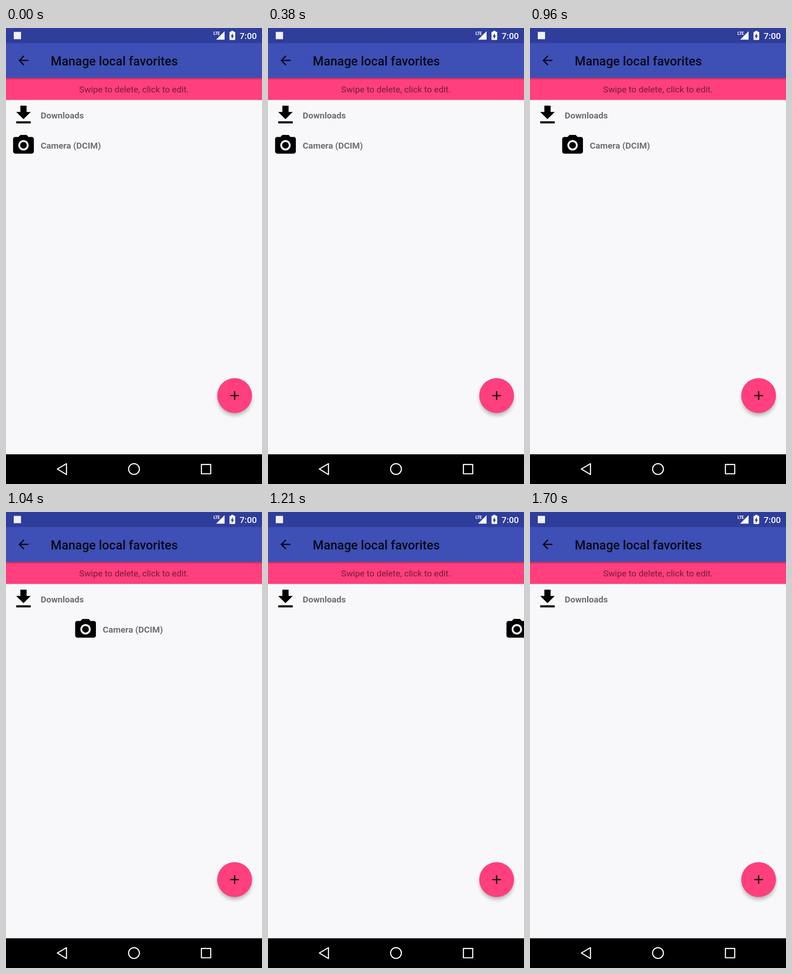
An HTML page for the animation above (1.99 s loop, 561x998 px).

```html
<!DOCTYPE html>
<html lang="en">
<head>
<meta charset="utf-8">
<title>Manage local favorites</title>
<style>
  html, body { margin: 0; width: 100%; height: 100%; overflow: hidden; background: #f8f8fa; }
  svg { display: block; width: 561px; height: 998px; }
  text { font-family: Roboto, sans-serif; font-size: 19.1px; }
  .title { font-size: 27.3px; font-weight: 500; fill: #080a16; }
  .hint { fill: #751d3b; text-anchor: middle; }
  .label { font-weight: 700; fill: #6f6f71; }
  .clock { font-weight: 500; fill: #fff; }
  .network { font-size: 9.5px; font-weight: 700; font-stretch: 75%; letter-spacing: -.5px; fill: #fff; }
  .nav { fill: none; stroke: #fff; stroke-width: 2.4; stroke-linejoin: round; }
  .swiped { animation: swipe 1990ms step-end infinite; }

  /* The finger drags the row, then flings it off the right edge. */
  @keyframes swipe {
    0% { transform: translateX(0); }
    46.1% { transform: translateX(20px); }
    48.2% { transform: translateX(55px); }
    50.2% { transform: translateX(93px); }
    52.2% { transform: translateX(136px); }
    54.2% { transform: translateX(204px); }
    56.2% { transform: translateX(296px); }
    58.2% { transform: translateX(400px); }
    60.7% { transform: translateX(507px); }
    62.8%, 100% { transform: translateX(600px); }
  }
</style>
</head>
<body>
<svg viewBox="0 0 561 998">
  <defs>
    <linearGradient id="barShadow" x2="0" y2="1">
      <stop stop-color="#000" stop-opacity=".3"/>
      <stop offset="1" stop-color="#000" stop-opacity="0"/>
    </linearGradient>
    <filter id="soft" x="-30%" y="-30%" width="160%" height="160%">
      <feGaussianBlur stdDeviation="4.5"/>
    </filter>
  </defs>

  <rect width="561" height="998" fill="#f8f8fa"/>

  <!-- Status bar -->
  <rect width="561" height="33" fill="#2f3d9b"/>
  <rect x="17" y="8.5" width="16" height="16" fill="#eef0f4"/>
  <text class="network" x="454.5" y="15">LTE</text>
  <path d="M479 7V25.5H460.5Z" fill="#fff"/>
  <path transform="translate(481 4.2) scale(1.25 1)" fill="#fff" d="M15.67 4H14V2h-4v2H8.33C7.6 4 7 4.6 7 5.33v15.33C7 21.4 7.6 22 8.33 22h7.33c.74 0 1.34-.6 1.34-1.33V5.33C17 4.6 16.4 4 15.67 4zM11 20v-5.5H9L13 7v5.5h2L11 20z"/>
  <text class="clock" x="512" y="23.5">7:00</text>

  <!-- Toolbar and hint -->
  <rect y="33" width="561" height="76" fill="#3e4fb6"/>
  <path transform="translate(21.9 54.6) scale(1.365)" fill="#080a16" d="M20 11H7.83l5.59-5.59L12 4l-8 8 8 8 1.41-1.41L7.83 13H20v-2z"/>
  <text class="title" x="98" y="81.5">Manage local favorites</text>
  <rect y="109" width="561" height="48.5" fill="#ff3f7e"/>
  <rect y="109" width="561" height="5" fill="url(#barShadow)"/>
  <text class="hint" x="280.5" y="141">Swipe to delete, click to edit.</text>

  <!-- Favorites -->
  <path transform="translate(11 163.2) scale(2.275)" d="M19 9h-4V3H9v6H5l7 7 7-7zM5 18v2h14v-2H5z"/>
  <text class="label" x="76" y="198">Downloads</text>
  <g class="swiped">
    <g transform="translate(11 229.4) scale(2.275)">
      <circle cx="12" cy="12" r="3.2"/>
      <path d="M9 2L7.17 4H4c-1.1 0-2 .9-2 2v12c0 1.1.9 2 2 2h16c1.1 0 2-.9 2-2V6c0-1.1-.9-2-2-2h-3.17L15 2H9zm3 15c-2.76 0-5-2.24-5-5s2.24-5 5-5 5 2.24 5 5-2.24 5-5 5z"/>
    </g>
    <text class="label" x="76" y="264">Camera (DCIM)</text>
  </g>

  <!-- Add button -->
  <circle cx="501" cy="811" r="37" opacity=".28" filter="url(#soft)"/>
  <circle cx="501" cy="804.5" r="38.2" fill="#ff3f7e"/>
  <path d="M491.5 804.5h19M501 795v19" stroke="#0c0508" stroke-width="2.7"/>

  <!-- Navigation bar -->
  <rect y="933" width="561" height="65"/>
  <g class="nav">
    <path d="M112.5 965.3L132.5 953.5V977.2Z"/>
    <circle cx="280.5" cy="965.3" r="11.8"/>
    <rect x="428.2" y="955.2" width="20.4" height="20.4"/>
  </g>
</svg>
</body>
</html>
```
